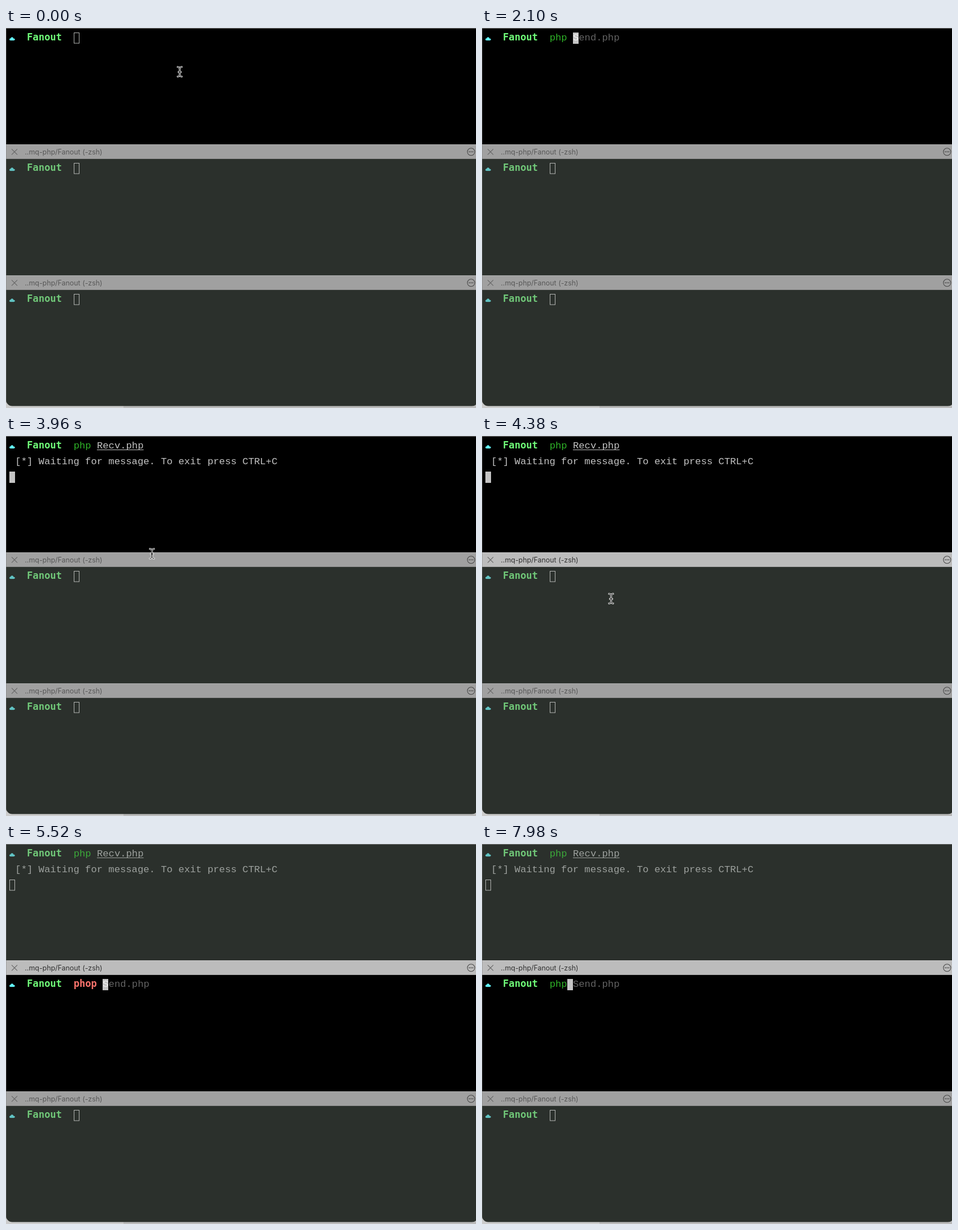
These frames come from a looping animation (832 px wide and 673 px high, 8 s). An HTML page with a canvas:

```html
<!DOCTYPE html>
<html lang="en">
<head>
<meta charset="utf-8">
<title>Terminal panes</title>
<style>
  html, body { margin: 0; width: 100%; height: 100%; overflow: hidden; background: #c6c6c6; }
  canvas { display: block; }
</style>
</head>
<body>
<canvas id="stage" width="832" height="673"></canvas>
<script>
const ctx = document.getElementById('stage').getContext('2d');
const LOOP = 8000, CELL = 10.33, LEFT = 6, ROW = 27.6, PROMPT = 11;
const MONO = '17.2px "Liberation Mono", monospace';
const BOLD = 'bold 17.15px "DejaVu Sans Mono", monospace';

const LIVE = { bg: '#000', dir: '#6ffa78', cloud: '#62f3f7', ok: '#2fb428', bad: '#fa736c',
  text: '#c4c4c4', ghost: '#636363' };
const IDLE = { ...LIVE, bg: '#2b302c', dir: '#70c778', cloud: '#61c4c4', ok: '#3caa3a', text: '#9da19e' };

// [start, typed, suggestion]
const topKeys = [
  [0, '', ''],
  [780, 'p', ''],
  [840, 'p', 'hp Send.php'],
  [1200, 'ph', 'p Send.php'],
  [1380, 'php', ' Send.php'],
  [2100, 'php ', 'Send.php'],
  [2520, 'php R', 'ecv.php'],
  [2820, 'php Recv.php', ''],
  [2880, 'php Recv.php ', '']
];
const midKeys = [
  [0, '', ''],
  [4980, 'p', ''],
  [5040, 'p', 'hp Send.php'],
  [5220, 'ph', 'p Send.php'],
  [5400, 'pho', 'p Send.php'],
  [5520, 'phop ', 'Send.php'],
  [6180, 'phop R', ''],
  [6780, 'phop ', ''],
  [6900, 'phop', ''],
  [7020, 'pho', ''],
  [7260, 'ph', 'p Send.php'],
  [7980, 'php', ' Send.php']
];

const colX = col => LEFT + col * CELL;
const at = (keys, t) => keys.filter(k => k[0] <= t).pop();

function box(x, y, w, h, color) {
  ctx.fillStyle = color;
  ctx.fillRect(x, y, w, h);
}

function put(str, col, y, color, font = MONO) {
  ctx.font = font;
  ctx.fillStyle = color;
  ctx.fillText(str, colX(col), y);
}

function line(points, color, width) {
  ctx.strokeStyle = color;
  ctx.lineWidth = width;
  ctx.beginPath();
  points.forEach(([x, y], i) => i ? ctx.lineTo(x, y) : ctx.moveTo(x, y));
  ctx.stroke();
}

function dot(x, y, r, color) {
  ctx.fillStyle = color;
  ctx.beginPath();
  ctx.arc(x, y, r, 0, Math.PI * 2);
  ctx.fill();
}

function cursor(col, y, solid) {
  const x = Math.round(colX(col));
  if (solid) return box(x, y, 10, 20, '#c4c4c4');
  ctx.strokeStyle = '#b4b6b4';
  ctx.lineWidth = 1;
  ctx.strokeRect(x + .5, y + .5, 9, 18.5);
}

function cloud(y, color) {
  dot(8, y + 20.2, 1.9, color);
  dot(10.7, y + 18.8, 2.5, color);
  dot(13.9, y + 20.3, 1.8, color);
  box(8, y + 19.5, 6, 2.6, color);
}

function command(typed, ghost, y, pal) {
  const base = y + 22;
  const [cmd, arg = ''] = typed.split(' ');
  if (cmd === 'php') put(cmd, PROMPT, base, pal.ok);
  else put(cmd, PROMPT, base, pal.bad, BOLD);
  if (arg) {
    const col = PROMPT + cmd.length + 1;
    put(arg, col, base, pal.text);
    box(colX(col), y + 24, arg.length * CELL, 1, pal.text);
  }
  if (ghost) put(ghost, PROMPT + typed.length, base, pal.ghost);
}

function promptLine(y, pal) {
  cloud(y, pal.cloud);
  put('Fanout', 3, y + 22, pal.dir, BOLD);
}

function editLine(key, y, pal, solid) {
  const [, typed, ghost] = key;
  const col = PROMPT + typed.length;
  command(typed, ghost, y, pal);
  cursor(col, y + 8, solid);
  if (solid && ghost) put(ghost[0], col, y + 22, '#f4f4f4');
}

function titleBar(y, bright) {
  const ink = bright ? '#333' : '#585858';
  const icon = bright ? '#6a6a6a' : '#686868';
  box(0, y, 832, 26, bright ? '#bcbcbc' : '#a0a0a0');
  box(0, y, 832, 1, bright ? '#c6c6c6' : '#a9a9a9');
  box(0, y + 25, 832, 1, bright ? '#a6a6a6' : '#8d8d8d');
  const m = y + 13.3;
  line([[10, m - 5], [20, m + 5]], icon, 1.2);
  line([[20, m - 5], [10, m + 5]], icon, 1.2);
  ctx.font = '12.4px Inter, sans-serif';
  ctx.fillStyle = ink;
  ctx.fillText('..mq-php/Fanout (-zsh)', 33.3, y + 18);
  ctx.strokeStyle = '#484848';
  ctx.lineWidth = 1.1;
  ctx.beginPath();
  ctx.arc(823.3, m, 6.5, 0, Math.PI * 2);
  ctx.stroke();
  for (const dx of [-3, 0, 3]) dot(823.3 + dx, m, 1, '#484848');
}

function iBeam(x, y) {
  const stem = (color, width) => {
    line([[x - 3.5, y - 8.5], [x - 1.5, y - 8], [x, y - 6], [x, y + 6], [x - 1.5, y + 8], [x - 3.5, y + 8.5]], color, width);
    line([[x + 3.5, y - 8.5], [x + 1.5, y - 8], [x, y - 6], [x, y + 6], [x + 1.5, y + 8], [x + 3.5, y + 8.5]], color, width);
    line([[x - 2, y + .5], [x + 2, y + .5]], color, width);
  };
  ctx.lineCap = 'square';
  stem('#f2f2f2', 2.8);
  stem('#000', 1);
  ctx.lineCap = 'butt';
}

function mouse(t) {
  if (t < 780) return [307.5, 77.5];
  if (t < 3900 || t >= 4980) return null;
  if (t >= 4500) return [332, 284];
  const step = Math.min(6, Math.floor((t - 3900) / 60) + 1);
  const k = 1 - Math.pow(1 - step / 6, 2.4);
  return [307.5 - 79 * k, 77.5 + 210.5 * k];
}

function topPane(t, live) {
  const pal = live ? LIVE : IDLE;
  box(0, 0, 832, 206, pal.bg);
  promptLine(0, pal);
  if (t < 3480) return editLine(at(topKeys, t), 0, pal, t >= 60);
  command('php Recv.php', '', 0, pal);
  if (t < 3660) return cursor(0, 8 + ROW, true);
  put('[*] Waiting for message. To exit press CTRL+C', 1, 22 + ROW, pal.text);
  cursor(0, Math.round(8 + 2 * ROW), live);
}

function draw(t) {
  const moved = t >= 4440;
  box(0, 0, 832, 673, '#b9b9b9');
  box(0, 660, 208, 13, '#cbcbcb');
  ctx.save();
  ctx.beginPath();
  ctx.roundRect(0, -20, 836, 689.5, 11);
  ctx.clip();
  topPane(t, !moved);
  box(0, 0, 832, 1, '#777');

  const mid = moved ? LIVE : IDLE;
  box(0, 232, 832, 206, mid.bg);
  promptLine(231, mid);
  editLine(at(midKeys, t), 231, mid, moved);

  box(0, 464, 832, 209, IDLE.bg);
  promptLine(463, IDLE);
  editLine(['', '', ''], 463, IDLE, false);

  titleBar(206, t >= 4380);
  titleBar(438, false);
  box(0, 0, 1, 670, 'rgba(130,130,130,.45)');
  ctx.restore();

  const pos = mouse(t);
  if (pos) iBeam(...pos);
}

const start = performance.now();
function tick() {
  draw((performance.now() - start) % LOOP);
  requestAnimationFrame(tick);
}
tick();
</script>
</body>
</html>
```
